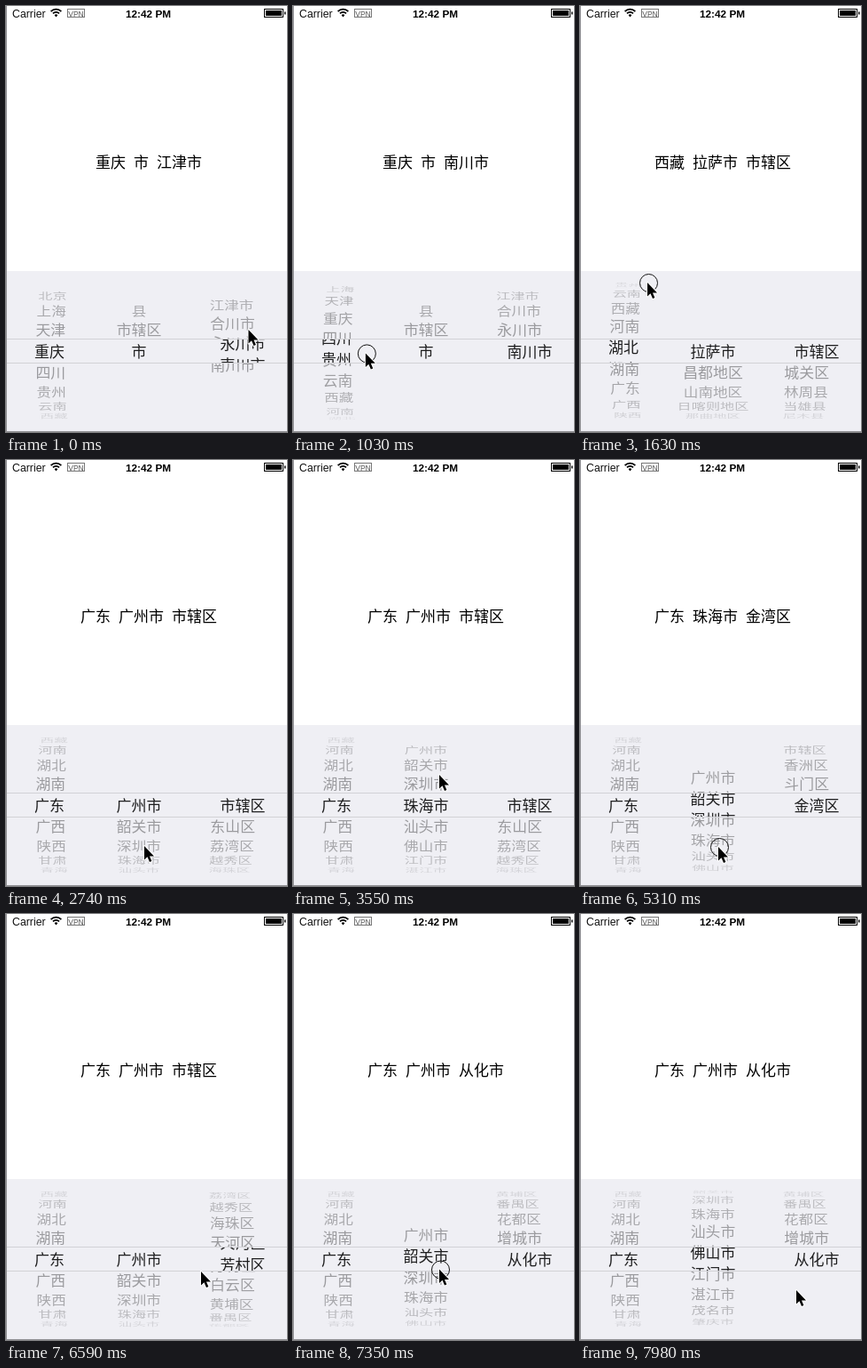
Animation, 317 px wide and 479 px high, one loop 8000 ms. Source, as an HTML page with a canvas:

```html
<!DOCTYPE html>
<html lang="zh-CN">
<head>
<meta charset="utf-8">
<title>Region picker</title>
<style>
html, body { margin: 0; width: 100%; height: 100%; overflow: hidden; background: #fff; }
canvas { display: block; width: 317px; height: 479px; }
</style>
</head>
<body>
<canvas id="stage"></canvas>
<script>
const W = 317, H = 479, LOOP = 8000;
const TOP = 298, MID = 388, LENS_TOP = 374, LENS_BOTTOM = 402;
const RADIUS = 77, STEP = Math.PI / 10;
const CJK = '17px "Noto Sans CJK SC", "Noto Sans CJK", sans-serif';
const LATIN = '"Liberation Sans", sans-serif';

const canvas = document.getElementById('stage');
const g = canvas.getContext('2d');
const ratio = window.devicePixelRatio || 1;
canvas.width = W * ratio;
canvas.height = H * ratio;

const list = text => text.split(' ');
const provinces = list('北京 上海 天津 重庆 四川 贵州 云南 西藏 河南 湖北 湖南 广东 广西 陕西 甘肃 青海 宁夏 新疆');
const chongqing = list('县 市辖区 市');
const tibet = list('拉萨市 昌都地区 山南地区 日喀则地区 那曲地区 阿里地区');
const guangdong = list('广州市 韶关市 深圳市 珠海市 汕头市 佛山市 江门市 湛江市 茂名市 肇庆市 惠州市 梅州市');
const chongqingCities = list('江津市 合川市 永川市 南川市');
const lhasa = list('市辖区 城关区 林周县 当雄县 尼木县 曲水县');
const guangzhou = list('市辖区 东山区 荔湾区 越秀区 海珠区 天河区 芳村区 白云区 黄埔区 番禺区 花都区 增城市 从化市');
const zhuhai = list('市辖区 香洲区 斗门区 金湾区');

// start time, label, rows of the second and third wheel
const scenes = [
  [0, '重庆 市 江津市', chongqing, chongqingCities],
  [420, '重庆 市 南川市', chongqing, chongqingCities],
  [1400, '西藏 拉萨市 市辖区', tibet, lhasa],
  [2200, '广东 广州市 市辖区', guangdong, guangzhou],
  [3620, '广东 珠海市 市辖区', guangdong, zhuhai],
  [4540, '广东 珠海市 金湾区', guangdong, zhuhai],
  [5700, '广东 广州市 市辖区', guangdong, guangzhou],
  [7260, '广东 广州市 从化市', guangdong, guangzhou]
];

// time, value(s); a trailing 'out' decelerates into that key
const spin = [
  [[0, 3], [910, 3], [1060, 5], [1350, 7, 'out'], [1490, 7], [1630, 9.17], [1690, 9.17], [2120, 11, 'out']],
  [[0, 2], [1400, 2], [1400, 0], [2800, 0], [3140, 3, 'out'], [5120, 3], [5310, 1.3], [5370, 1.3],
   [5650, 0, 'out'], [7270, 0], [7480, 3], [7980, 5.3, 'out']],
  [[0, 2.33], [150, 2.33], [400, 3, 'out'], [1400, 3], [1400, 0], [3960, 0], [4190, 2.7], [4300, 3, 'out'],
   [5700, 3], [5700, 0], [6170, 0], [6420, 3.2], [6590, 5.75], [6650, 5.75], [7250, 12, 'out']]
];
const pathX = [[0, 273.5], [150, 273.5], [730, 83], [910, 83], [1630, 76], [1750, 76], [2510, 156], [2800, 156],
  [3140, 165], [3550, 165], [3610, 165], [3920, 256], [4190, 262], [4480, 262], [5060, 156], [5370, 156],
  [6080, 258], [6420, 250], [6590, 220], [6650, 220], [6940, 165], [7480, 165], [7940, 244]];
const pathY = [[0, 364], [150, 364], [450, 462], [730, 440], [910, 440], [1060, 378], [1300, 378], [1490, 363],
  [1630, 311], [1690, 311], [2510, 434], [2800, 434], [3140, 354], [3610, 354], [3920, 425], [4190, 350],
  [4480, 350], [4800, 460], [5120, 394], [5310, 435], [5370, 435], [6080, 428], [6170, 428], [6420, 345],
  [6590, 402], [6650, 402], [6940, 430], [7270, 430], [7480, 350], [7940, 423]];
const touches = [[910, 1060], [1460, 1700], [2800, 3440], [3940, 4180], [5100, 5370], [6170, 6420], [7250, 7480]];

function valueAt(keys, t) {
  const i = keys.findLastIndex(k => k[0] <= t);
  const a = keys[i], b = keys[i + 1];
  if (!b) return a[1];
  let p = (t - a[0]) / (b[0] - a[0]);
  if (b[2]) p = 1 - (1 - p) ** 2;
  return a[1] + (b[1] - a[1]) * p;
}

function write(text, x, y, font, color, align = 'left') {
  g.font = font;
  g.fillStyle = color;
  g.textAlign = align;
  g.fillText(text, x, y);
}

function clipped(y, height, draw) {
  g.save();
  g.beginPath();
  g.rect(0, y, W, height);
  g.clip();
  draw();
  g.restore();
}

function drawWheel(rows, pos, x, lean, alpha) {
  rows.forEach((name, i) => {
    const angle = (i - pos) * STEP;
    if (Math.abs(angle) > 1.4) return;
    const c = Math.cos(angle);
    g.save();
    g.translate(x + lean * (1 - c), MID + RADIUS * Math.sin(angle));
    g.scale(1 - 0.12 * (1 - c), c);
    write(name, 0, 6.5, CJK, `rgba(0,0,0,${alpha * c})`, 'center');
    g.restore();
  });
}

function drawPicker(scene, t) {
  const wheels = [provinces, scene[2], scene[3]].map((rows, i) => [rows, valueAt(spin[i], t)]);
  const rowX = [50, 150, 256], lensX = [49, 150, 267], lean = [6, 0, -6];
  const outer = () => wheels.forEach((w, i) => drawWheel(...w, rowX[i], lean[i], 0.37));
  g.fillStyle = '#efeff4';
  g.fillRect(0, TOP, W, H - TOP);
  clipped(TOP, LENS_TOP - TOP, outer);
  clipped(LENS_BOTTOM, H - LENS_BOTTOM, outer);
  clipped(LENS_TOP, LENS_BOTTOM - LENS_TOP, () =>
    wheels.forEach((w, i) => drawWheel(...w, lensX[i], 0, 0.88)));
  g.fillStyle = '#d2d2d6';
  g.fillRect(0, LENS_TOP, W, 1);
  g.fillRect(0, LENS_BOTTOM - 1, W, 1);
}

function drawStatus() {
  write('Carrier', 7, 12.5, `12.3px ${LATIN}`, '#111');
  write('12:42 PM', 160.5, 12.5, `bold 11.8px ${LATIN}`, '#000', 'center');
  write('VPN', 79, 11.5, `8.5px ${LATIN}`, '#555', 'center');
  g.lineWidth = 1;
  g.strokeStyle = '#777';
  g.strokeRect(69.5, 3.5, 19, 9);
  // signal arcs
  g.strokeStyle = '#000';
  g.lineWidth = 1.8;
  for (const r of [5, 8.3]) {
    g.beginPath();
    g.arc(56.5, 12, r, -Math.PI * 0.75, -Math.PI * 0.25);
    g.stroke();
  }
  g.fillStyle = '#000';
  g.beginPath();
  g.moveTo(56.5, 12.5);
  g.arc(56.5, 12, 2.6, -Math.PI * 0.75, -Math.PI * 0.25);
  g.fill();
  // battery
  g.lineWidth = 1;
  g.strokeRect(291.5, 3.5, 21, 9);
  g.fillRect(293, 5, 18, 6);
  g.fillRect(314, 6.5, 1.5, 3);
}

function drawLabel(text) {
  const words = list(text), gap = 9;
  const width = s => s.length * 17;
  let x = 161 - (words.reduce((sum, w) => sum + width(w), 0) + gap * (words.length - 1)) / 2;
  for (const word of words) {
    write(word, x, 181.5, CJK, '#000');
    x += width(word) + gap;
  }
}

const arrow = new Path2D('M0 0V15.6L3.5 12.3L6 18L8.4 17L6 11.4H11Z');

function drawCursor(t) {
  g.save();
  g.translate(valueAt(pathX, t), valueAt(pathY, t));
  if (touches.some(([from, to]) => t >= from && t < to)) {
    g.strokeStyle = '#111';
    g.lineWidth = 1;
    g.beginPath();
    g.arc(1.5, 0.5, 10, 0, 7);
    g.stroke();
  }
  g.lineJoin = 'round';
  g.lineWidth = 2;
  g.strokeStyle = '#fff';
  g.stroke(arrow);
  g.fillStyle = '#000';
  g.fill(arrow);
  g.restore();
}

function draw(now) {
  const t = now % LOOP;
  const scene = scenes.findLast(s => s[0] <= t);
  g.setTransform(ratio, 0, 0, ratio, 0, 0);
  g.fillStyle = '#fff';
  g.fillRect(0, 0, W, H);
  drawStatus();
  drawLabel(scene[1]);
  drawPicker(scene, t);
  g.fillStyle = '#929296';
  g.fillRect(0, 0, 1, H);
  g.fillRect(0, H - 1, W, 1);
  drawCursor(t);
}

let start;
function tick(now) {
  start ??= now;
  draw(Math.max(0, now - start));
  requestAnimationFrame(tick);
}
draw(0);
requestAnimationFrame(tick);
</script>
</body>
</html>
```
